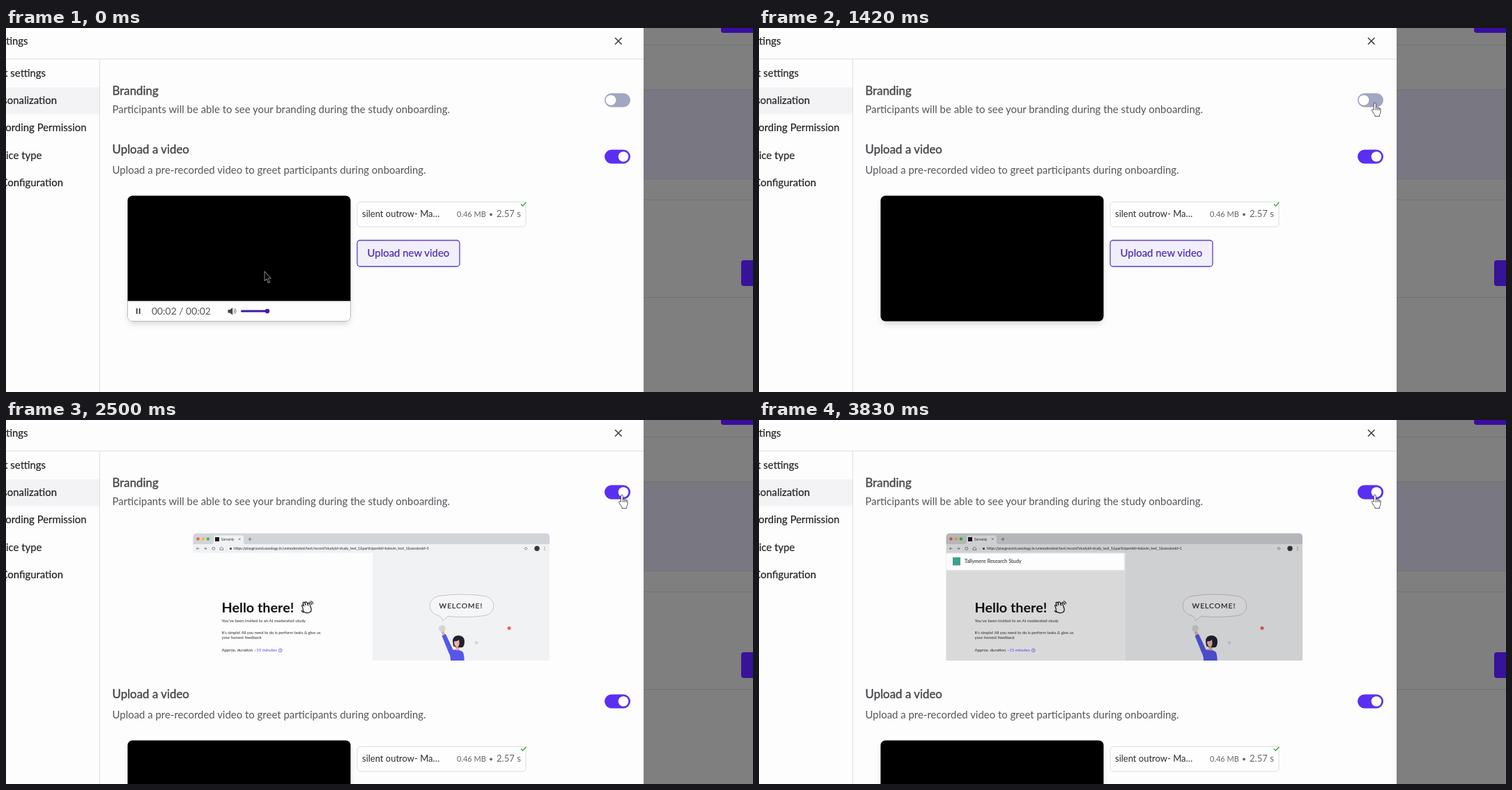
Recreate the animation shown at these times as an HTML page. Size 1072x522 px, loop 4 s.

```html
<!DOCTYPE html>
<html lang="en">
<head>
<meta charset="utf-8">
<title>Study settings</title>
<style>
  html, body { margin: 0; width: 100%; height: 100%; overflow: hidden; background: #fdfdfd; }
  svg { display: block; width: 1072px; height: 522px; }
  text { font-family: Lato, "Open Sans", sans-serif; font-size: 14.95px; fill: #55555c; white-space: pre; }
  .nav text { font-size: 14.9px; fill: #232327; stroke: #232327; stroke-width: .2px; text-anchor: end; }
  .head { font-size: 16.9px; fill: #444449; stroke: #444449; stroke-width: .35px; }
  .page text { font-size: 6.05px; fill: #2c2c31; }
  .line { stroke: #dfdfe2; }
</style>
</head>
<body>
<svg viewBox="0 0 1072 522">
  <defs>
    <filter id="soft" x="-10%" y="-10%" width="120%" height="130%">
      <feDropShadow dx="0" dy="5" stdDeviation="4" flood-color="#000" flood-opacity=".14"/>
    </filter>
    <filter id="glow" x="-10%" y="-30%" width="120%" height="180%">
      <feDropShadow dx="0" dy="0" stdDeviation="1.5" flood-color="#fff" flood-opacity=".7"/>
    </filter>
    <clipPath id="videoClip"><rect x="174.500" y="240.500" width="320" height="180" rx="7"/></clipPath>
    <clipPath id="pageClip"><path d="M268.500 345V168q0-5.500 5.500-5.500H775q5 0 5 5.500V345z"/></clipPath>
  </defs>

  <rect width="1072" height="522" fill="#fdfdfd"/>

  <!-- dimmed page behind the drawer -->
  <g>
    <rect x="915" width="157" height="522" fill="#7f7f7f"/>
    <rect x="915" y="88" width="157" height="128" fill="#787782"/>
    <path d="M915 24.500h157M915 88.500h157M915 216.500h157M915 246.500h157M915 386.500h157" stroke="#717174"/>
    <rect x="1026" y="-20" width="80" height="27" rx="4" fill="#390e9f"/>
    <rect x="1055" y="333" width="60" height="37" rx="4" fill="#371399"/>
  </g>

  <!-- drawer header and navigation -->
  <g class="nav">
    <rect y="85" width="134" height="38.500" fill="#f3f3f5"/>
    <path class="line" d="M0 44.500H915M134.500 45V522"/>
    <text x="31.500" y="24">Settings</text>
    <text x="57" y="70">Test settings</text>
    <text x="73" y="109">Personalization</text>
    <text x="115.500" y="148">Recording Permission</text>
    <text x="51.500" y="187.500">Device type</text>
    <text x="82" y="226.500">Configuration</text>
    <path d="M874 14l9.500 9.500M883.500 14l-9.500 9.500" stroke="#444" stroke-width="1.700"/>
  </g>

  <text class="head" x="152.500" y="96">Branding</text>
  <text x="152.500" y="122">Participants will be able to see your branding during the study onboarding.</text>
  <rect x="859" y="93.500" width="37" height="20" rx="10" fill="#a3a6c0"/>
  <rect id="on" x="859" y="93.500" width="37" height="20" rx="10" fill="#5b2ff2"/>
  <circle id="knob" cy="103.500" r="7.300" fill="#fff"/>

  <!-- browser preview -->
  <g id="page" class="page" clip-path="url(#pageClip)">
    <rect x="268" y="162" width="512" height="183" fill="#fdfdfd"/>
    <rect x="526" y="190" width="254" height="155" fill="#f1f2f4"/>
    <rect x="268" y="162" width="512" height="16" fill="#d1d4d8"/>
    <path d="M268 178h27q3 0 3-3v-7q0-2.500 2.500-2.500h38q2.500 0 2.500 2.500v7q0 3 3 3H780v12.500H268z" fill="#f0f1f3"/>
    <circle cx="275.500" cy="170.500" r="2.200" fill="#f0594f"/>
    <circle cx="282.700" cy="170.500" r="2.200" fill="#f3b92f"/>
    <circle cx="290" cy="170.500" r="2.200" fill="#3bbd49"/>
    <rect x="300" y="168" width="6" height="6" fill="#1c1c1f"/>
    <text x="309" y="173" style="font-size:4.800px">Sorvenly</text>
    <path d="M334 169.500l2.500 2.500m0-2.500l-2.500 2.500M347.500 171h5m-2.500-2.500v5" stroke="#55585d" stroke-width=".7"/>
    <g fill="none" stroke="#666a70" stroke-width=".8">
      <path d="M277.500 184.300h-4m1.700-1.700l-1.700 1.700 1.700 1.700M284 184.300h4m-1.700-1.700l1.700 1.700-1.700 1.700"/>
      <circle cx="297.800" cy="184.300" r="2"/>
      <path d="M307 184l2.300-2 2.300 2v2.300h-4.600zM744 184.300l2-2 2 2-2 2z"/>
    </g>
    <rect x="321" y="183" width="3" height="3" rx=".6" fill="#55585d"/>
    <text x="327" y="186.200" style="font-size:5.220px">https://playground.useology.in/unmoderated/test/record?studyid=study_test_1&amp;participantid=kalovin_test_1&amp;sessionid=1</text>
    <circle cx="762" cy="184.300" r="3.700" fill="#37393f"/>
    <path d="M773 182v.8m0 1.200v.8m0 1.200v.8" stroke="#444" stroke-width="1"/>

    <!-- greeting illustration -->
    <path d="M621 280.500C604 277 604 256 621 252.500Q654 247.500 687 252.500C704 256 704 277 687 280.500Q662 284 634 281.500L626.500 288Q627 284 621 280.500z" fill="#f6f6f8" stroke="#c3c5ca"/>
    <text x="621.500" y="270" style="font-size:10.300px;letter-spacing:1px;fill:#303036;stroke:#303036;stroke-width:.25px">WELCOME!</text>
    <circle cx="626" cy="299" r="4.800" fill="#d3d5d9"/>
    <circle cx="675" cy="319.500" r="2.300" fill="#d3d5d9"/>
    <circle cx="722" cy="298.500" r="2.500" fill="#f0606b"/>
    <path d="M624.500 304l4-1 2.500 5.500-4 1.500z" fill="#e9a99b"/>
    <path d="M625.500 309.500l5.500-2.500 10.500 22.500q10-.5 14 3 2.500 5 2 14.500H638q.5-8-3-14z" fill="#5657ea"/>
    <path d="M645.500 323h5v6.500q-2.500 2-5 0z" fill="#e9a99b"/>
    <path d="M641 317q.5-8 8.500-8 8.500.5 8.500 8.500 0 6.500-3 8.500-9 1-13-2z" fill="#20222e"/>
    <path d="M643 317.500q5 0 7-2.500 2 9-2.500 11-4.500-1.500-4.500-8.500z" fill="#f0b4a6"/>

    <rect id="dim" x="268" y="162" width="512" height="183" fill="#000"/>

    <text x="309.500" y="276" style="font-size:19.800px;font-weight:700;fill:#111">Hello there!</text>
    <path d="M426 270l-1.500-4q2-1.500 3 1l-1.500-5q2-1.500 3 .5l1 3-1-4q2-1.500 3.200.5l1.300 4-.5-3q2-1.500 3 1.500l2 6q1 5-4 6-5 1-7.500-2.500zM435 261q3 .5 4 4M437 259.500q3 1 4 4M427 276q-2-1-3-3" fill="none" stroke="#151515" stroke-width="1.200" stroke-linejoin="round"/>
    <text x="309.500" y="290">You've been invited to an AI moderated study</text>
    <text x="309.500" y="307" style="font-size:5.850px">It's simple! All you need to do is perform tasks &amp; give us</text>
    <text x="309.500" y="314">your honest feedback</text>
    <text x="309.500" y="332">Approx. duration <tspan fill="#5b3ff0">~15 minutes</tspan></text>
    <path d="M393.700 328.800v1.800l1.200.7" fill="none" stroke="#5b3ff0" stroke-width=".6"/>
    <circle cx="393.700" cy="330.400" r="2.400" fill="none" stroke="#5b3ff0" stroke-width=".7"/>

    <g id="brand">
      <rect x="269" y="191.500" width="255" height="23.500" fill="#fdfdfd" filter="url(#glow)"/>
      <rect x="278" y="197" width="11" height="11.500" fill="#3f9f8d"/>
      <text x="295" y="205.300" style="font-size:7.300px;fill:#46464b;stroke:#46464b;stroke-width:.15px">Tallymere Research Study</text>
    </g>
  </g>

  <!-- video section -->
  <g id="upload">
    <text class="head" x="152.500" y="180">Upload a video</text>
    <text x="152.500" y="208.500">Upload a pre-recorded video to greet participants during onboarding.</text>
    <rect x="859" y="174.500" width="37" height="20" rx="10" fill="#5b2ff2"/>
    <circle cx="886" cy="184.500" r="7.300" fill="#fff"/>
    <rect x="176" y="242" width="317" height="177.500" rx="7" fill="#fff" filter="url(#soft)"/>
    <g clip-path="url(#videoClip)">
      <rect x="174" y="240" width="321" height="181" fill="#000"/>
      <g id="controls">
        <rect x="174" y="391.500" width="321" height="30" fill="#fefefe"/>
        <path d="M187.700 402v8M191.700 402v8" stroke="#444" stroke-width="1.900"/>
        <text x="209" y="410.500" style="font-size:13.900px">00:02 / 00:02</text>
        <path d="M318.500 404h2.700l4-3v10.500l-4-3h-2.700z" fill="#444"/>
        <path d="M327 403.500q2 2.500 0 5M328.700 402q3 4 0 8" fill="none" stroke="#666" stroke-width=".9"/>
        <path d="M338.500 406H375" stroke="#3d1cad" stroke-width="3" stroke-linecap="round"/>
        <circle cx="375" cy="406" r="3.200" fill="#3d1cad"/>
      </g>
    </g>
    <rect x="504" y="249.500" width="242" height="35.500" rx="4.500" fill="#fefefe" stroke="#dcdce0"/>
    <text x="511" y="270.500" style="font-size:13px;fill:#2c2c31">silent outrow- Ma…</text>
    <text x="647" y="270.500" style="font-size:11px;fill:#65656b">0.46 MB</text>
    <circle cx="696" cy="267.500" r="1.900" fill="#65656b"/>
    <text x="704" y="270.500" style="font-size:13.100px;fill:#65656b">2.57 s</text>
    <path d="M739 252.500l2.500 2.700 5-5.500" fill="none" stroke="#3fae55" stroke-width="1.500"/>
    <rect x="504" y="304.500" width="147" height="37.500" rx="4" fill="#f2effc" stroke="#5c3fc2" stroke-width="1.300"/>
    <text x="518.500" y="328" style="fill:#4c2dae;stroke:#4c2dae;stroke-width:.2px">Upload new video</text>
  </g>

  <circle id="press" cx="884" cy="110" r="23" fill="#ec78b8" fill-opacity=".5" stroke="#c33c86" stroke-width="2"/>
  <path id="arrow" d="M0 0V13.500L3 10.800 5.300 16.500 7.600 15.500 5.300 10H9.300z" stroke-width="1.100" stroke-linejoin="round"/>
  <path id="hand" d="M882.300 117.500V109q0-1.700 1.500-1.700t1.500 1.700v5q1.400-1 2.500.4 1.500-.8 2.300.6 1.900-.5 1.900 1.500v4q0 2-1.500 4v2.200h-6.500v-2q-2-1.700-4-5.700-1-2.200.3-2.600 1.200-.2 2 1.100zM885.300 114v4M887.800 114.500v3.500M890.100 115v3" fill="#fff" stroke="#3c3c42" stroke-width=".9" stroke-linejoin="round"/>
</svg>

<script>
  const LOOP = 4000, FPS = 12;
  const el = id => document.getElementById(id);
  const set = (id, attrs) => {
    for (const name in attrs) el(id).setAttribute(name, attrs[name]);
  };
  const show = (id, visible) => set(id, { visibility: visible ? "visible" : "hidden" });

  // Linear value at time t from [time, value] steps.
  function at(t, steps) {
    if (t <= steps[0][0]) return steps[0][1];
    for (let i = 1; i < steps.length; i++) {
      const [t0, a] = steps[i - 1], [t1, b] = steps[i];
      if (t < t1) return a + (b - a) * (t - t0) / (t1 - t0);
    }
    return steps[steps.length - 1][1];
  }

  const pathX = [[640, 371], [750, 540], [833, 745], [916, 861], [1000, 880], [1083, 884]];
  const pathY = [[640, 349], [750, 305], [833, 253], [916, 213], [1000, 145], [1083, 110]];
  const knobX = [[1917, 868], [2000, 870], [2083, 881], [2166, 886]];
  const onFade = [[2000, 0], [2166, 1]];
  const pressFade = [[1660, 0], [1833, 1], [2250, 1], [2416, 0]];
  const dimFade = [[2833, 0], [3250, .115], [3500, .14]];
  const brandFade = [[2833, 0], [3250, .7], [3583, 1]];

  function draw(t) {
    const x = at(t, pathX), y = at(t, pathY);
    const inVideo = x < 494 && y > 241;
    set("arrow", {
      transform: `translate(${x} ${y})`,
      fill: inVideo ? "#0a0a0a" : "#fff",
      stroke: inVideo ? "#777" : "#26262a"
    });
    show("arrow", t < 1080);
    show("hand", t >= 1080);
    show("controls", inVideo);
    set("knob", { cx: at(t, knobX) });
    set("on", { opacity: at(t, onFade) });
    set("press", { opacity: at(t, pressFade) });
    set("upload", { transform: `translate(0 ${t >= 2000 ? 219 : 0})` });
    show("page", t >= 2330);
    set("dim", { opacity: at(t, dimFade) });
    set("brand", { opacity: at(t, brandFade) });
  }

  function tick() {
    const t = performance.now() % LOOP;
    draw(Math.floor(t * FPS / 1000) * 1000 / FPS);
    requestAnimationFrame(tick);
  }
  tick();
</script>
</body>
</html>
```
